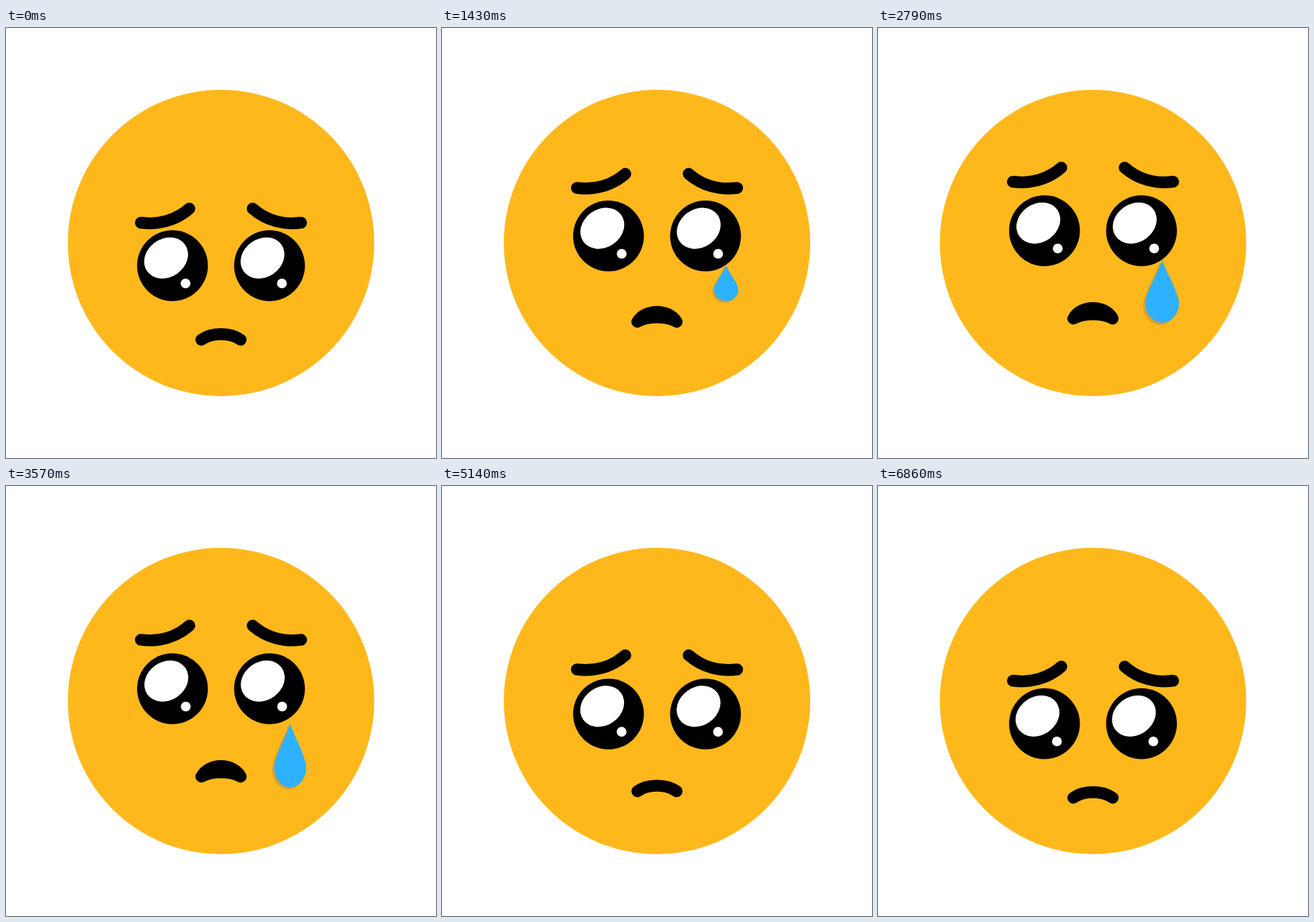
An HTML page for the animation above (6.93 s loop, 640x640 px).

```html
<!DOCTYPE html>
<html lang="en">
<head>
<meta charset="utf-8">
<title>Teary face</title>
<style>
  html, body { margin: 0; width: 100%; height: 100%; overflow: hidden; background: #fff; }
  svg { display: block; width: 100%; height: 100%; }
  .line { stroke: #000; stroke-width: 17.6; stroke-linecap: round; stroke-linejoin: round; }
</style>
</head>
<body>
<svg viewBox="0 0 640 640">
  <defs>
    <path id="brow" class="line" fill="none" d="M200.8 289.8C226 293 252 287 272.8 268.8"/>
    <path id="drop" d="M0 0C.12 .2 .5 .52 .5 .69C.5 .86 .28 1 0 1S-.5 .86 -.5 .69C-.5 .52 -.12 .2 0 0Z"/>
    <g id="shine" fill="#fff">
      <ellipse rx="34.5" ry="28.5" transform="translate(238.3 342.3) rotate(-35)"/>
      <circle cx="267.2" cy="380.2" r="7.3"/>
    </g>
  </defs>
  <circle cx="320" cy="320" r="228" fill="#ffb81c"/>
  <g id="brows">
    <use href="#brow"/>
    <use href="#brow" transform="translate(640) scale(-1 1)"/>
  </g>
  <g id="eyes">
    <circle cx="247.8" cy="353.7" r="52.7"/>
    <circle cx="392.2" cy="353.7" r="52.7"/>
    <g id="shines">
      <use href="#shine"/>
      <use href="#shine" x="143.5"/>
    </g>
  </g>
  <path id="mouth" class="line"/>
  <g id="tear">
    <use id="shadow" href="#drop" fill="#8c6450" fill-opacity=".3"/>
    <use id="water" href="#drop" fill="#2eb2ff"/>
  </g>
</svg>
<script>
const LOOP = 6930, FRAME = LOOP / 97;
const el = id => document.getElementById(id);
const set = (id, name, value) => el(id).setAttribute(name, value);
const shift = (id, x, y) => set(id, 'transform', `translate(${x} ${y})`);
const clamp = x => Math.min(1, Math.max(0, x));
const span = (t, from, to) => clamp((t - from) / (to - from));
const mix = (a, b, k) => a + (b - a) * k;
const smooth = x => x * x * (3 - 2 * x);

// Ease along the cubic curve (a, 0) (b, 1)
function ease(x, a, b) {
  let lo = 0, hi = 1;
  for (let i = 0; i < 24; i++) {
    const s = (lo + hi) / 2, r = 1 - s;
    if (3 * a * s * r * r + 3 * b * s * s * r + s * s * s < x) lo = s; else hi = s;
  }
  return smooth((lo + hi) / 2);
}

function drawMouth(lift, pout) {
  const y = 464 - 35 * lift + 3.5 * pout;
  const left = 290.7, right = 349.3;
  const top = y - 11.2 - 9.8 * pout, low = y - 11.2 + 2.8 * pout;
  const dx = 15 - 4 * pout;
  set('mouth', 'd', `M${left} ${y}C${left + dx} ${top} ${right - dx} ${top} ${right} ${y}` +
    `C${right - 15} ${low} ${left + 15} ${low} ${left} ${y}Z`);
}

function drawTear(t, eyeY) {
  const grow = 1 - (1 - span(t, 570, 2370)) ** 2;
  const width = 50 * grow - Math.max(0, t - 2900) * 0.0038;
  const ratio = mix(1.46, 1.86, span(t, 1430, 2790)) + 0.27 * span(t, 2790, 4210);
  const fall = (Math.max(0, t - 2740) * 0.00235) ** 3;
  const y = 397.6 + eyeY + fall, d = width * 0.066;
  const place = (id, dx, dy) =>
    set(id, 'transform', `translate(${423 + dx} ${y + dy}) scale(${width} ${width * ratio})`);
  set('tear', 'visibility', t > 570 && t < 4990 ? 'visible' : 'hidden');
  set('tear', 'opacity', 1 - span(t, 4640, 4990));
  if (width > 0) {
    place('shadow', -d, d);
    place('water', 0, 0);
  }
}

function draw(t) {
  const lift = ease(span(t, 0, 2640), 0.346, 0.153) - ease(span(t, 3443, 6398), 0.712, 0.289);
  const pout = t < 3443 ? lift : 1 - smooth(span(t, 4000, 5100));
  const eyeY = -52 * lift;
  shift('brows', 0, -61 * lift);
  shift('eyes', 0, eyeY);
  shift('shines', 0.35 * lift - 0.9 * span(t, 6350, 6860), 0);
  drawMouth(lift, pout);
  drawTear(t, eyeY);
}

const start = performance.now();
function tick() {
  const t = (performance.now() - start) % LOOP;
  draw(Math.min(96, Math.floor((t + 5) / FRAME)) * FRAME);
  requestAnimationFrame(tick);
}
tick();
</script>
</body>
</html>
```
